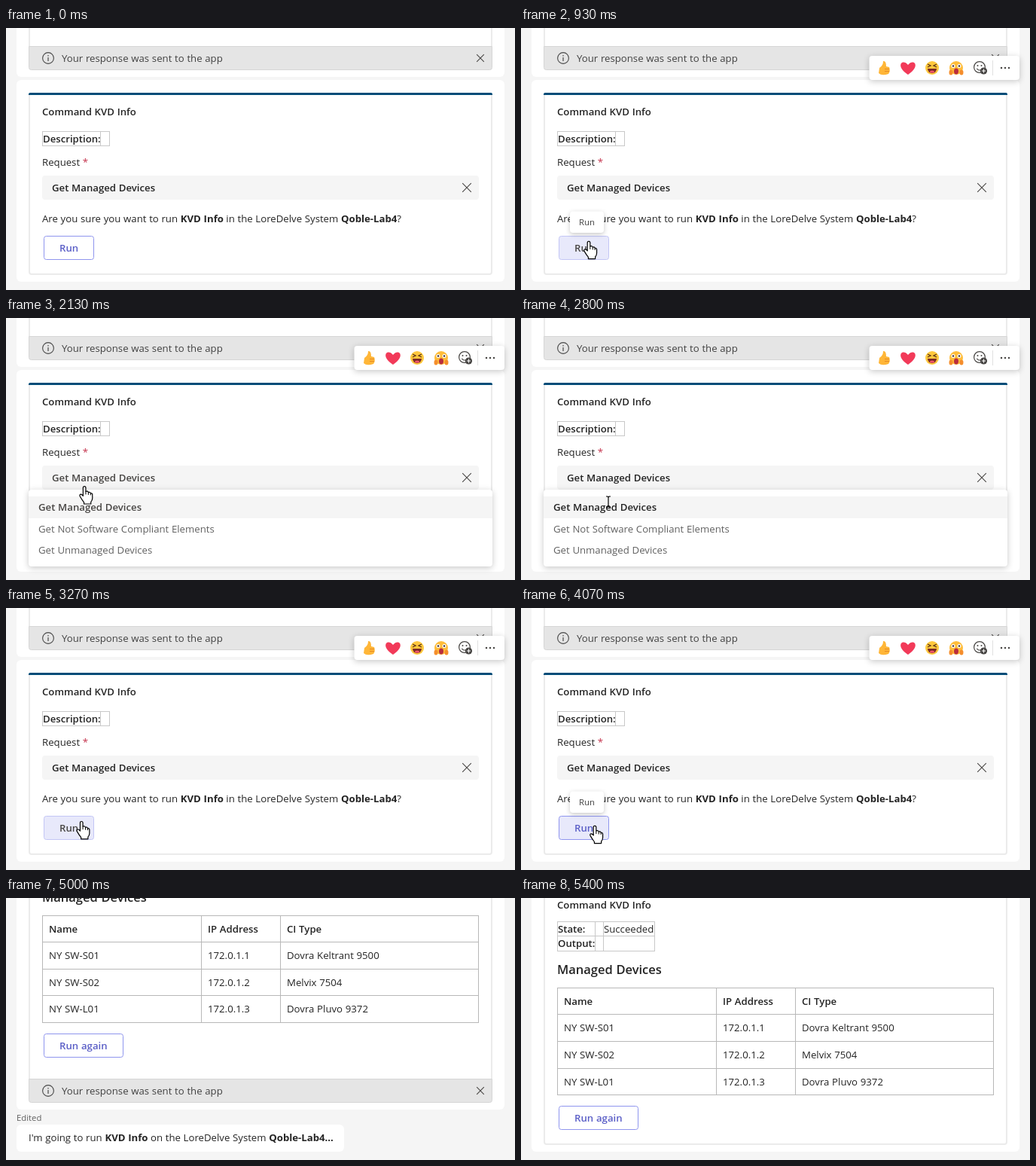
Recreate the animation shown at these times as an HTML page with a canvas. Size 676 px wide and 348 px high, loop 7.74 s.

```html
<!DOCTYPE html>
<html lang="en">
<head>
<meta charset="utf-8">
<title>Command card</title>
<style>
html, body { margin: 0; width: 100%; height: 100%; overflow: hidden; background: #f5f5f5; }
canvas { display: block; width: 676px; height: 348px; }
</style>
</head>
<body>
<canvas id="stage"></canvas>
<script>
const W = 676, H = 348, LOOP = 7740, TICK = 200 / 3;
const INK = '#242424', SOFT = '#484644', GRAY = '#616161', PURPLE = '#5b5fc7';
const COMMAND = 'KVD Info', PRODUCT = 'LoreDelve', SYSTEM = 'Qoble-Lab4';

const canvas = document.getElementById('stage');
const ctx = canvas.getContext('2d');
const ratio = window.devicePixelRatio || 1;
canvas.width = W * ratio;
canvas.height = H * ratio;
ctx.wordSpacing = '0.3px';

function text(str, x, y, { weight = 400, size = 13.2, color = INK } = {}) {
  ctx.font = `${weight} ${size}px "Open Sans", "Noto Sans", sans-serif`;
  ctx.fillStyle = color;
  ctx.fillText(str, x, y);
  return x + ctx.measureText(str).width;
}

// Alternates regular and bold runs, starting with regular.
function runs(parts, x, y) {
  parts.forEach((part, i) => { x = text(part, x, y, { weight: i % 2 ? 700 : 400 }); });
}

function box(x, y, w, h, r, fill, stroke, shadow) {
  ctx.save();
  ctx.beginPath();
  ctx.roundRect(x, y, w, h, r);
  if (shadow) {
    ctx.shadowColor = 'rgba(0,0,0,.22)';
    ctx.shadowBlur = shadow * ratio;
    ctx.shadowOffsetY = 2 * ratio;
  }
  if (fill) { ctx.fillStyle = fill; ctx.fill(); }
  ctx.restore();
  if (stroke) { ctx.strokeStyle = stroke; ctx.lineWidth = 1; ctx.stroke(); }
}

function lines(color, width, ...paths) {
  ctx.beginPath();
  for (const p of paths)
    for (let i = 0; i < p.length; i += 2) ctx[i ? 'lineTo' : 'moveTo'](p[i], p[i + 1]);
  ctx.strokeStyle = color;
  ctx.lineWidth = width;
  ctx.stroke();
}

function disc(x, y, rx, color, ry = rx) {
  ctx.beginPath();
  ctx.ellipse(x, y, rx, ry, 0, 0, 7);
  ctx.fillStyle = color;
  ctx.fill();
}

function ring(x, y, r, color, width) {
  ctx.beginPath();
  ctx.arc(x, y, r, 0, 7);
  ctx.strokeStyle = color;
  ctx.lineWidth = width;
  ctx.stroke();
}

function cross(x, y, r) {
  lines(SOFT, 1.1, [x - r, y - r, x + r, y + r], [x + r, y - r, x - r, y + r]);
}

function grid(xs, ys, color) {
  const [left, right] = [xs[0], xs[xs.length - 1]], [top, bottom] = [ys[0], ys[ys.length - 1]];
  lines(color, 1,
    ...xs.map(x => [x + .5, top, x + .5, bottom + 1]),
    ...ys.map(y => [left, y + .5, right + 1, y + .5]));
}

function button(label, y, w, { fill = '#fff', stroke = '#8f95ee', color = PURPLE } = {}) {
  box(50.5, y + .5, w, 31, 3, fill, stroke);
  text(label, 71, y + 21, { weight: 600, color });
}

function cardSides(bottom) {
  lines('#ebebeb', 2, [31, -5, 31, bottom], [645, -5, 645, bottom]);
}

function cardOutline(top) {
  ctx.beginPath();
  ctx.roundRect(31, top, 614, 327 - top, 3);
  ctx.strokeStyle = '#ebebeb';
  ctx.lineWidth = 2;
  ctx.stroke();
}

function responseBar(y) {
  box(30.5, y + .5, 615, 31, [0, 0, 3, 3], '#e5e5e5', '#d6d6d6');
  ring(56, y + 16, 7.4, '#484848', 1.1);
  lines('#484848', 1.2, [56, y + 15, 56, y + 20], [56, y + 12, 56, y + 13.4]);
  text('Your response was sent to the app', 74, y + 21, { color: '#424242' });
  cross(630, y + 16, 4.8);
}

const DEVICES = [
  ['Name', 'IP Address', 'CI Type'],
  ['NY SW-S01', '172.0.1.1', 'Dovra Keltrant 9500'],
  ['NY SW-S02', '172.0.1.2', 'Melvix 7504'],
  ['NY SW-L01', '172.0.1.3', 'Dovra Pluvo 9372'],
];
const ROW = 35.6;

function deviceTable(y) {
  const top = Math.floor(y);
  text('Managed Devices', 48, top - 18, { weight: 600, size: 16.5 });
  grid([48, 259, 364, 627], [0, 1, 2, 3, 4].map(r => Math.floor(y + r * ROW)), '#b8b8b8');
  DEVICES.forEach((row, r) => row.forEach((cell, c) =>
    text(cell, [57, 268, 373][c], Math.floor(y + 23 + r * ROW), { weight: r ? 400 : 600 })));
  button('Run again', top + 157, 105);
}

function thumb(x, y) {
  ctx.beginPath();
  ctx.moveTo(x - 6, y);
  ctx.quadraticCurveTo(x - 1, y - 3, x - 1, y - 9);
  ctx.quadraticCurveTo(x + 3, y - 10, x + 3, y - 2);
  ctx.lineTo(x + 7, y - 1);
  ctx.quadraticCurveTo(x + 9, y + 4, x + 6, y + 8);
  ctx.quadraticCurveTo(x - 3, y + 11, x - 7, y + 7);
  ctx.fillStyle = '#ffb638';
  ctx.fill();
  lines('#e68a23', 1, [x + 1, y + 1.5, x + 7, y + 1.5], [x + 1, y + 4.5, x + 7, y + 4.5]);
}

function heart(x, y) {
  ctx.beginPath();
  ctx.moveTo(x, y + 9);
  ctx.bezierCurveTo(x - 18, y - 3, x - 7, y - 13, x, y - 4);
  ctx.bezierCurveTo(x + 7, y - 13, x + 18, y - 3, x, y + 9);
  ctx.fillStyle = '#f23a59';
  ctx.fill();
}

function laugh(x, y) {
  disc(x, y, 9, '#ffc83d');
  lines('#5b3218', 1.3, [x - 6, y - 5, x - 2, y - 3, x - 6, y - 1], [x + 6, y - 5, x + 2, y - 3, x + 6, y - 1]);
  ctx.beginPath();
  ctx.arc(x, y + 1, 6, 0, Math.PI);
  ctx.fillStyle = '#7a2a25';
  ctx.fill();
  disc(x, y + 5, 3, '#f2566b', 1.6);
}

function wow(x, y) {
  disc(x, y, 9, '#ffbd3b');
  for (const s of [-1, 1]) {
    disc(x + s * 4, y - 2.5, 2.5, '#fff');
    disc(x + s * 4, y - 2.5, 1.2, '#402a32');
    disc(x + s * 7, y + 6, 2.5, '#f58e2c', 3.5);
  }
  disc(x, y + 4.5, 3, '#b92d3f', 4);
}

function reactions() {
  box(462.5, 37, 199.5, 32, 4, '#fff', null, 8);
  thumb(482, 53);
  heart(514, 53);
  laugh(546, 53);
  wow(578, 53);
  ring(609, 52, 7.4, SOFT, 1.2);
  disc(606.5, 50, 1, SOFT);
  disc(611.5, 50, 1, SOFT);
  ctx.beginPath();
  ctx.arc(609, 52, 4, .4, 2.7);
  ctx.stroke();
  disc(614.5, 57, 4.6, SOFT);
  lines('#fff', 1.1, [612, 57, 617, 57], [614.5, 54.5, 614.5, 59.5]);
  lines('#e0e0e0', 1, [626.5, 43, 626.5, 63]);
  [-5, 0, 5].forEach(d => disc(643 + d, 53, 1.25, SOFT));
}

function dropdown(hovered) {
  box(30, 228, 616, 102, 4, '#fff', null, 9);
  ctx.fillStyle = '#f5f5f5';
  ctx.fillRect(30, 237, 616, 29);
  text('Get Managed Devices', 43, 256, { weight: 600, color: hovered ? INK : SOFT });
  text('Get Not Software Compliant Elements', 43, 285, { color: GRAY });
  text('Get Unmanaged Devices', 43, 313, { color: GRAY });
}

function commandScene(s) {
  box(14, -10, 648, 75, 6, '#fff');
  cardSides(25);
  responseBar(24);
  box(14, 69, 648, 268, 6, '#fff');
  cardOutline(87);
  box(30, 86, 616, 3, [2, 2, 0, 0], '#004c78');
  text('Command ' + COMMAND, 48, 116, { weight: 600 });
  grid([48, 125, 137], [137, 156], '#c8c8c8');
  text('Description:', 49, 152, { weight: 600 });
  text('*', text('Request ', 48, 183), 183, { color: '#c4314b' });
  box(48, 196, 580, 32, 4, '#f5f5f5');
  text('Get Managed Devices', 61, 217, { weight: 600, color: s.overField ? SOFT : INK });
  cross(612, 212, 5.8);
  runs(['Are you sure you want to run ', COMMAND, ` in the ${PRODUCT} System `, SYSTEM, '?'], 48, 258);

  let look = {};
  if (s.pressed) look = { fill: '#e8e9fb' };
  else if (s.overButton) look = { fill: '#e8e9fb', stroke: '#c3c6f5', color: SOFT };
  button('Run', 276, 66, look);

  if (s.list) dropdown(s.overOption);
  if (s.toolbar) reactions();
  if (s.tooltip) {
    box(65, 243.5, 45, 28.5, 4, '#fff', null, 6);
    text('Run', 77, 262, { size: 11.3, color: '#424242' });
  }
}

function sentScene() {
  box(14, -10, 648, 291, 6, '#fff');
  cardSides(241);
  deviceTable(23);
  responseBar(240);
  text('Edited', 14, 296, { size: 11.3, color: GRAY });
  box(14, 301, 435, 36, 6, '#fff');
  runs(["I'm going to run ", COMMAND, ` on the ${PRODUCT} System `, SYSTEM + '...'], 30, 323);
}

function resultScene(opacity) {
  box(14, -10, 648, 347, 6, '#fff');
  cardOutline(-10);
  ctx.globalAlpha = opacity;
  text('Command ' + COMMAND, 48, 14, { weight: 600 });
  grid([48, 98, 109, 177], [31, 50, 70], '#c8c8c8');
  text('State:', 49, 46, { weight: 600 });
  text('Succeeded', 110, 46);
  text('Output:', 49, 65, { weight: 600 });
  deviceTable(119.3);
  ctx.globalAlpha = 1;
}

const HAND = 'M-1.8 8.5V1.3Q-1.8-.7 0-.7T1.8 1.3V6Q4.6 5 5.2 7.2Q7.8 6.3 8.2 8.6Q10.4 8 10.6 10.2V15Q10.5 18 8.6 20V22.6H-.6V20.5Q-3 17.5-6 12.4Q-6.8 10.4-5 9.8Q-3.6 9.6-1.8 12Z';
const ARROW = 'M0 0V16.5L3.8 12.8L6.4 18.8L9 17.7L6.4 11.9H11.7Z';

function cursor(kind, x, y) {
  if (kind === 'beam') {
    lines('#000', 1.2, [x - 3, y - 7, x - 1, y - 7, x, y - 6, x, y + 6, x - 1, y + 7, x - 3, y + 7],
      [x + 3, y - 7, x + 1, y - 7, x, y - 6], [x, y + 6, x + 1, y + 7, x + 3, y + 7]);
    return;
  }
  const shape = new Path2D(kind === 'hand' ? HAND : ARROW);
  ctx.save();
  ctx.translate(x, y);
  ctx.fillStyle = '#fff';
  ctx.strokeStyle = '#000';
  ctx.lineWidth = 1.2;
  ctx.lineJoin = 'round';
  ctx.fill(shape);
  ctx.stroke(shape);
  if (kind === 'hand') lines('#000', 1, [1.8, 6, 1.8, 10], [5.2, 7.2, 5.2, 10.5], [8.2, 8.6, 8.2, 11]);
  ctx.restore();
}

// time, x, y
const PATH = [
  [133, 190, 352], [800, 90, 284], [930, 90, 284], [1530, 104, 222],
  [2067, 104, 222], [2330, 105, 237], [2600, 105, 237], [2800, 116, 244],
  [3400, 98, 290], [4067, 98, 290], [4333, 105, 222], [4533, 105, 222], [4930, 200, 360],
];

function pointer(t) {
  const i = PATH.findIndex(p => p[0] > t);
  if (i < 1) return [0, 400];
  const [a, b] = [PATH[i - 1], PATH[i]];
  const u = (t - a[0]) / (b[0] - a[0]), k = u * u * (3 - 2 * u);
  return [a[1] + (b[1] - a[1]) * k, a[2] + (b[2] - a[2]) * k];
}

const within = (v, from, to) => v >= from && v < to;

function draw(time) {
  const t = Math.floor((time + 4) / TICK) * TICK;
  ctx.setTransform(ratio, 0, 0, ratio, 0, 0);
  ctx.fillStyle = '#f5f5f5';
  ctx.fillRect(0, 0, W, H);
  if (t >= 5390) return resultScene(1);
  if (t >= 5120) return resultScene(.5);
  if (t >= 4990) return sentScene();

  const [x, y] = pointer(t);
  const inside = within(x, 48, 628);
  const s = {
    list: within(t, 1720, 2860),
    overField: inside && within(y, 196, 228),
    overOption: within(y, 236.5, 266),
    overButton: within(x, 50, 117) && within(y, 276, 308),
    pressed: within(t, 4060, 4120),
    toolbar: y < 337,
    tooltip: within(t, 860, 1130) || within(t, 3320, 4190),
  };
  commandScene(s);
  const kind = within(t, 2720, 2990) ? 'beam'
    : s.overField || s.overButton || s.list ? 'hand' : 'arrow';
  cursor(kind, x, y);
}

function frame(now) {
  draw(now % LOOP);
  requestAnimationFrame(frame);
}
requestAnimationFrame(frame);
</script>
</body>
</html>
```
